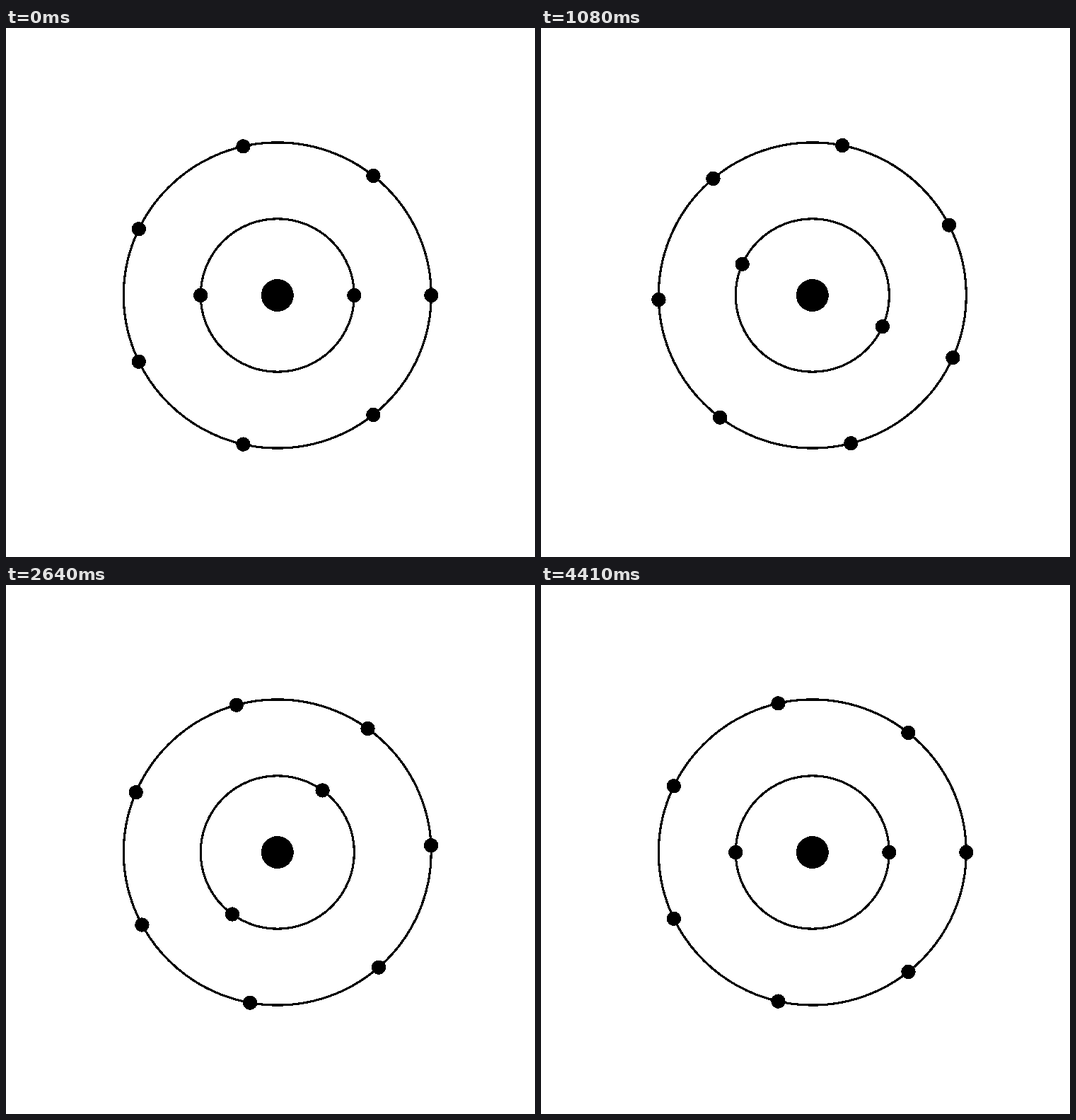
Recreate the animation shown at these times as an HTML page. Size 748 by 748 pixels, loop 4510 ms.

```html
<!DOCTYPE html>
<html>
<head>
<meta charset="utf-8">
<style>
  html, body { margin: 0; height: 100%; overflow: hidden; background: #fff; }
  svg { display: block; width: 100%; height: 100%; }
</style>
</head>
<body>
<svg viewBox="0 0 748 748" shape-rendering="crispEdges"></svg>
<script>
const svg = document.querySelector('svg');
const CX = 383.8, CY = 378;
const LOOP = 4510, STEP = 30, LAST = 4410;
const SPIN = 4500, TURN = 720, PEAK = 0.03;
const shells = [
  { rx: 108.6, ry: 108.2, count: 2 },
  { rx: 217.5, ry: 216.1, count: 7 }
];

function ellipse(rx, ry, style = {}) {
  const el = document.createElementNS('http://www.w3.org/2000/svg', 'ellipse');
  const attrs = { cx: CX, cy: CY, rx, ry, ...style };
  for (const name in attrs) el.setAttribute(name, attrs[name]);
  return svg.appendChild(el);
}

for (const { rx, ry } of shells) {
  ellipse(rx, ry, { fill: 'none', stroke: '#000', 'stroke-width': 3.2 });
}
ellipse(23, 23);
for (const shell of shells) {
  shell.dots = Array.from({ length: shell.count }, () => ellipse(10.2, 10.2));
}

// Short cubic acceleration, then a long cubic slowdown
function ease(p) {
  return p < PEAK
    ? p ** 3 / PEAK ** 2
    : 1 - (1 - p) ** 3 / (1 - PEAK) ** 2;
}

function draw(now) {
  const time = Math.min(LAST, Math.floor((now % LOOP) / STEP) * STEP);
  const angle = TURN * ease(time / SPIN) * Math.PI / 180;
  for (const { rx, ry, count, dots } of shells) {
    dots.forEach((dot, i) => {
      const a = angle + i * 2 * Math.PI / count;
      dot.setAttribute('cx', CX + rx * Math.cos(a));
      dot.setAttribute('cy', CY + ry * Math.sin(a));
    });
  }
}

const start = performance.now();
function tick() {
  draw(performance.now() - start);
  requestAnimationFrame(tick);
}
tick();
</script>
</body>
</html>
```
